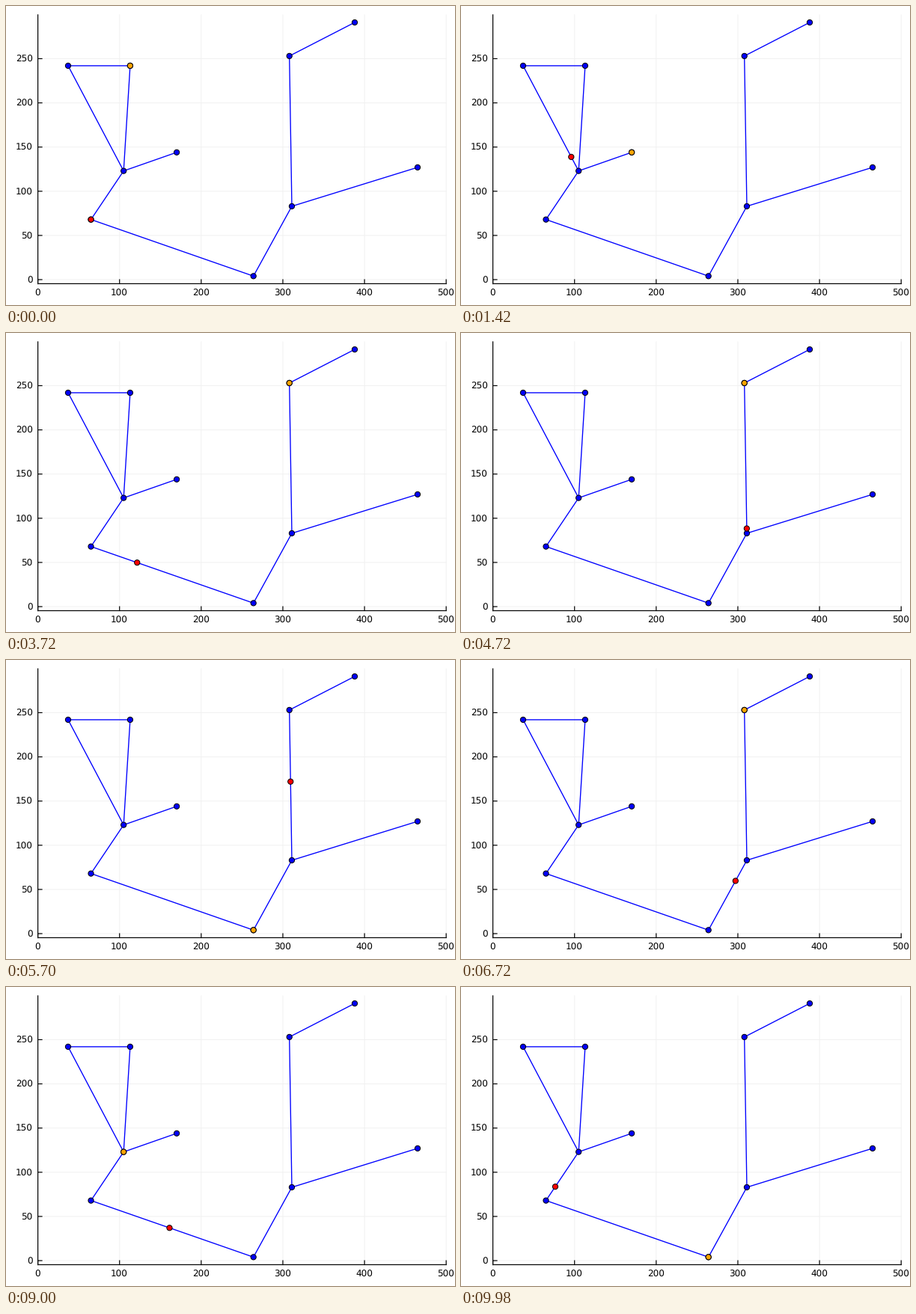
Animation, 600 px wide and 400 px high, one loop 10 s. Source, as a matplotlib script:

```python
import math

import matplotlib.pyplot as plt
from matplotlib.animation import FuncAnimation
from matplotlib.patches import Circle

W, H, DPI = 600, 400, 100
PT = 72 / DPI  # points per pixel
FRAMES, INTERVAL = 500, 20
SPEED = 5.4  # data units per frame

NODES = {
    "A": (37, 242), "B": (113, 242), "C": (105, 123), "D": (170, 144),
    "E": (65, 68), "F": (264, 4), "G": (311, 83), "H": (308, 253),
    "I": (388, 291), "J": (465, 127),
}
EDGES = ["AB", "AC", "BC", "CD", "CE", "EF", "FG", "GH", "GJ", "HI"]

# Each trip: frames spent waiting before the goal is picked, then the path.
TRIPS = [(1, "ECA"), (4, "ACD"), (2, "DCB"), (4, "BCEFGH"),
         (2, "HGF"), (2, "FGH"), (2, "HGFEC"), (4, "CEF")]

# Plot area in pixels, with y pointing down
LEFT, RIGHT, TOP, BOTTOM = 42.6, 588.2, 11.8, 371.5
Y_MIN, Y_MAX = -4.61, 299.61


def to_px(x, y):
    return (LEFT + x * (RIGHT - LEFT) / 500,
            BOTTOM - (y - Y_MIN) * (BOTTOM - TOP) / (Y_MAX - Y_MIN))


def walk(a, b):
    """Positions along one edge at constant speed, snapping to the end node."""
    (xa, ya), (xb, yb) = NODES[a], NODES[b]
    length = math.hypot(xb - xa, yb - ya)
    steps = round(length / SPEED)
    for k in range(1, steps + 1):
        u = 1 if k == steps else k * SPEED / length
        yield xa + u * (xb - xa), ya + u * (yb - ya)


def build_timeline():
    goal = "B"
    timeline = [(NODES["E"], goal)]
    for wait, path in TRIPS:
        here = NODES[path[0]]
        timeline += [(here, goal)] * (wait - 1)
        goal = path[-1]
        timeline.append((here, goal))
        for a, b in zip(path, path[1:]):
            timeline += [(NODES[a], goal)] * 2  # short stop at every node
            timeline += [(pos, goal) for pos in walk(a, b)]
    return timeline[:FRAMES]


TIMELINE = build_timeline()

plt.rcParams["text.hinting"] = "none"
fig = plt.figure(figsize=(W / DPI, H / DPI), dpi=DPI, facecolor="white")
ax = fig.add_axes([0, 0, 1, 1])
ax.set_xlim(0, W)
ax.set_ylim(H, 0)
ax.axis("off")


def line(p, q, color, width, z):
    ax.plot([p[0], q[0]], [p[1], q[1]], color=color, lw=width * PT,
            zorder=z, snap=False)


def dot(point, color, z):
    # A patch keeps its exact place, where a marker is moved to whole pixels.
    return ax.add_patch(Circle(to_px(*point), 3.6, fc=color, ec="black",
                               lw=PT, zorder=z, snap=False))


def label(x, y, value, align):
    ax.text(x, y + 4.6, str(value), fontsize=12 * PT, family="DejaVu Sans",
            ha=align, va="baseline", color="black")


for v in range(0, 501, 100):
    x = to_px(v, 0)[0]
    line((x, TOP), (x, BOTTOM), "#f1f1f1", 1, 0)
    line((x, BOTTOM), (x, BOTTOM - 5.4), "black", 1.2, 2)
    label(x - 0.5, 383, v, "center")
for v in range(0, 251, 50):
    y = to_px(0, v)[1]
    line((LEFT, y), (RIGHT, y), "#f1f1f1", 1, 0)
    line((LEFT, y), (LEFT + 5.4, y), "black", 1.2, 2)
    label(35.8, y, v, "right")
line((LEFT, TOP), (LEFT, BOTTOM), "black", 1.2, 2)
line((LEFT, BOTTOM), (RIGHT, BOTTOM), "black", 1.2, 2)

for a, b in EDGES:
    line(to_px(*NODES[a]), to_px(*NODES[b]), "#0000ff", 1.35, 3)
for node in NODES.values():
    dot(node, "#0000ff", 4)
goal_dot = dot(NODES["B"], "#ffa500", 5)
walker = dot(NODES["E"], "#ff0000", 6)


def draw(i):
    pos, goal = TIMELINE[i]
    walker.center = to_px(*pos)
    goal_dot.center = to_px(*NODES[goal])
    return goal_dot, walker


anim = FuncAnimation(fig, draw, frames=FRAMES, interval=INTERVAL,
                     repeat=True, repeat_delay=0, blit=False)
plt.show()
```
